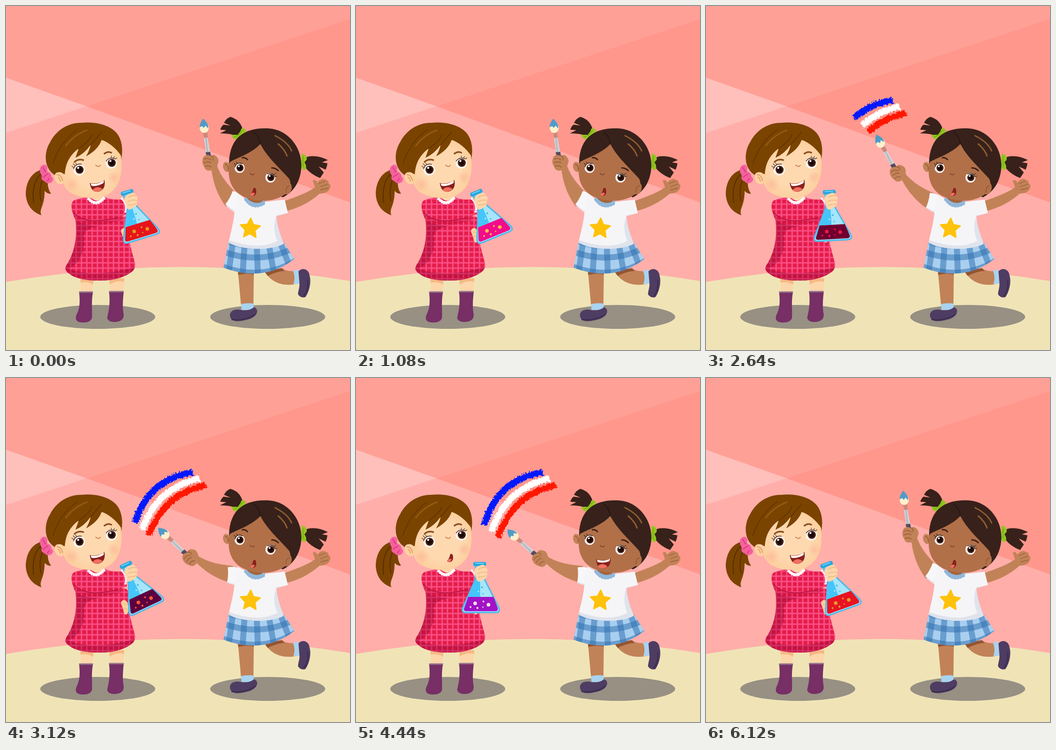
An HTML page for the animation above (6160 ms loop, 748x748 px).

```html
<!DOCTYPE html>
<html lang="en">
<head>
<meta charset="utf-8">
<title>Two girls</title>
<style>
html, body { margin: 0; width: 100%; height: 100%; overflow: hidden; }
svg { display: block; width: 100vw; height: 100vh; }
.line { fill: none; stroke-linecap: round; stroke-linejoin: round; }
.skin { fill: #fdd6aa; }
.tan { fill: #c28257; }
.brown { fill: #7b4300; }
.dark { fill: #37211a; }
.pink { fill: #f6609d; }
.green { fill: #93c51f; }
.boot { fill: #772f65; }
.shoe { fill: #4f3c62; }
.sock { fill: #a9d3ef; }
</style>
</head>
<body>
<svg viewBox="0 0 748 748">
<defs>
  <radialGradient id="face"><stop offset=".6" stop-color="#fed9b0"/><stop offset="1" stop-color="#fdd0a0"/></radialGradient>
  <radialGradient id="blush"><stop stop-color="#fba58e" stop-opacity=".45"/><stop offset="1" stop-color="#fba58e" stop-opacity="0"/></radialGradient>
  <pattern id="check" width="11.6" height="11.6" patternUnits="userSpaceOnUse">
    <rect width="12" height="12" fill="#e41d49"/><path d="M0 1.7H12M1.7 0V12" stroke="#fb5089" stroke-width="3"/>
  </pattern>
  <filter id="rough" x="-20%" y="-20%" width="140%" height="140%" color-interpolation-filters="sRGB">
    <feTurbulence type="fractalNoise" baseFrequency=".28" numOctaves="2" seed="4"/>
    <feDisplacementMap in="SourceGraphic" scale="10" xChannelSelector="R" yChannelSelector="G"/>
  </filter>
  <clipPath id="dressClip"><use href="#dress"/></clipPath>
  <clipPath id="shirtClip"><use href="#shirt"/></clipPath>
  <clipPath id="skirtClip"><use href="#skirt"/></clipPath>
  <g id="smile">
    <path d="M0 4Q18 8 32-3Q35 12 27 19Q16 27 7 20Q2 15 0 4Z" fill="#8b201d"/>
    <path d="M2 5Q18 8 31-2L30 4Q16 12 4 10Z" fill="#fff"/>
    <path d="M6 19Q16 8 28 17Q22 23 15 23Q9 23 6 19Z" fill="#f0705f"/>
  </g>
  <g id="gasp">
    <path d="M2-8Q7-10 8-3Q9 7 2 9Q-4 10-5 6Q0 2 2-8Z" fill="#8b201d"/>
    <path d="M-5 6Q0 0 5 3Q3 9-1 9Q-4 9-5 6Z" fill="#f0705f"/>
  </g>
  <g id="eye">
    <circle r="12.300" fill="#fff"/><circle cx="1" r="8.800" fill="#431f16"/><circle cx="1" r="5.500" fill="#190906"/>
    <circle cx="-2" cy="-4" r="2.300" fill="#fff"/>
  </g>
</defs>

<rect width="748" height="748" fill="#ffaea9"/>
<path d="M0 0H748V28L175 218L0 156Z" fill="#ffa096"/>
<path d="M748 28V427L175 218Z" fill="#ff978c"/>
<path d="M0 156L175 218L0 276Z" fill="#ffbfbb"/>
<path d="M0 600Q374 536 748 598V748H0Z" fill="#f0e4b7"/>
<g fill="#979083"><ellipse cx="199.500" cy="676" rx="125" ry="26"/><ellipse cx="569" cy="676" rx="125" ry="26"/></g>

<g id="leftGirl">
  <path class="brown" d="M88 354C58 356 43 380 43 410C45 432 55 447 77 455C73 447 77 440 80 431C83 421 84 412 84 402Q90 409 98 408Q88 395 92 372Z"/>
  <path class="line" stroke="#572e00" stroke-width="2" d="M76 365Q55 385 60 427M82 372Q70 398 76 424"/>
  <path class="pink" d="M76 349Q84 341 89 349Q91 355 88 359Q98 362 99 371Q106 377 99 383Q90 389 84 381Q75 379 78 369Q70 357 76 349Z"/>
  <path class="line" stroke="#d43b7d" stroke-width="2" d="M80 351L86 361M81 372L91 365M90 381L94 375"/>
  <path class="brown" d="M105 367C82 352 82 318 96 296C112 265 142 253 164 254C202 250 239 263 248 289C257 312 250 333 249 346L128 375Z"/>
  <path class="skin" d="M162 590H191L187 627H163ZM225 592H257L255 627H227Z"/>
  <path d="M162 591H191L189 606Q180 599 162 601ZM225 592H257V600Q240 595 225 606Z" fill="#f7b883"/>
  <path class="boot" d="M159 622H189C185 646 188 660 187 679Q182 690 163 688Q148 686 153 672C161 657 161 643 159 622ZM224 621H256C254 641 253 653 256 672Q256 685 239 687Q222 688 220 678C224 660 227 645 224 621Z"/>
  <path class="line" stroke="#91778b" stroke-width="3" d="M160 622H188M225 621H255"/>
  <path class="skin" d="M184 405H213V425Q198 434 182 421Z"/>
  <path id="dress" d="M147 423Q165 415 185 416Q198 431 213 415Q234 424 260 419L263 453L250 458Q265 455 266 467C263 498 270 521 280 557Q283 567 276 576C257 592 228 598 199 597C166 597 138 589 129 573Q128 567 135 558C151 529 155 498 151 465Q136 433 147 423Z" fill="url(#check)"/>
  <g clip-path="url(#dressClip)">
    <path d="M145 462Q177 482 212 476C188 482 170 484 169 501C174 535 157 562 136 571Q194 594 285 566V610H115L145 515Z" fill="#92002d" opacity=".38"/>
    <path d="M145 447Q178 478 246 458L252 466Q190 485 148 465Z" fill="#b1002d" opacity=".28"/>
  </g>
  <path class="line" stroke="#bd1741" stroke-width="2" d="M148 449Q170 478 243 460"/>
  <path class="line" stroke="#fff" stroke-width="5" stroke-dasharray=".1 5" d="M179 420Q196 439 214 418"/>
  <path class="line" stroke="#fff" stroke-width="3" d="M180 418Q196 435 213 416"/>
  <path class="line" stroke="#fff" stroke-width="5" stroke-dasharray=".1 5" d="M252 419Q264 430 260 447"/>
  <path d="M251 486Q257 479 263 487Q269 499 265 510Q261 518 257 512Q254 499 250 491Z" fill="#fbd19e"/>
  <path class="line" stroke="#e5a66f" d="M254 492Q260 491 263 495M256 501Q262 499 264 505"/>
  <ellipse cx="117" cy="374" rx="11" ry="14" fill="#fdd2a1" transform="rotate(-20 117 374)"/>
  <path class="line" stroke="#e39b66" stroke-width="2" d="M111 367Q120 366 123 380M113 372Q118 375 118 381"/>
  <path d="M126 358C126 332 149 300 198 291Q239 290 250 326C255 365 246 392 227 406C204 423 164 420 141 406C126 396 122 383 126 358Z" fill="url(#face)"/>
  <circle cx="143" cy="388" r="17" fill="url(#blush)"/><circle cx="235" cy="373" r="15" fill="url(#blush)"/>
  <path class="brown" d="M106 365C110 332 130 278 185 271C230 270 250 298 250 325Q232 300 208 291Q201 312 174 327Q182 313 184 302Q171 321 151 330L158 310C137 325 129 345 128 366Q115 357 106 365Z"/>
  <path class="line" stroke="#935a12" stroke-width="3" d="M130 304Q148 280 176 270"/>
  <path class="line" stroke="#5b3100" stroke-width="1.500" d="M102 343Q116 297 155 269M158 310Q183 293 187 279M184 302Q198 286 207 275"/>
  <use href="#eye" x="159" y="356"/><use href="#eye" x="229" y="341"/>
  <g class="line" stroke="#572d1d" stroke-width="1.200">
    <path d="M147 351L143 348M150 347L146 343M154 345L151 341M229 329L229 326M234 330L236 327M238 333L241 330"/>
    <path stroke-width="1.700" d="M147 354Q151 342 164 344M218 337Q225 327 237 332"/>
    <path stroke="#8b4f21" stroke-width="3.500" d="M149 339Q157 332 168 335M214 321Q222 315 229 319"/>
    <path stroke="#cc784b" stroke-width="1.700" d="M195 346Q202 352 205 346"/>
  </g>
  <use id="leftSmile" href="#smile" x="182" y="381"/><use id="leftGasp" href="#gasp" x="203" y="391"/>
</g>

<g id="flask">
  <path d="M260 408H279V437L309 496Q316 510 304 510H239Q227 510 233 497L260 437Z" fill="#a7e5fa" stroke="#4bb9eb" stroke-width="3"/>
  <path d="M261 410H270V476H244L237 503Q232 505 235 498L261 438Z" fill="#44c6fb"/>
  <path id="liquid" d="M244 476H299L308 500Q310 507 303 507H240Q232 507 236 499Z"/>
  <g id="bubbles"><circle cx="259" cy="490" r="4"/><circle cx="288" cy="493" r="4"/><circle cx="277" cy="486" r="2"/><circle cx="264" cy="500" r="2.300"/><circle cx="249" cy="498" r="2"/><circle cx="276" cy="498" r="1.500"/></g>
  <circle cx="274" cy="455" r="2" fill="#42b9ed"/><circle cx="266" cy="464" r="1.500" fill="#d6f4ff"/><circle cx="276" cy="469" r="2" fill="#63cbed"/>
  <rect x="255" y="400" width="28" height="9" rx="4" fill="#28a7e2"/>
  <path class="line" stroke="#73d6fb" stroke-width="2" d="M260 403H277"/>
</g>
<path class="skin" d="M257 421Q258 410 269 408Q278 403 282 411Q288 416 285 425Q286 436 276 439Q266 447 262 438Z"/>
<path class="line" stroke="#e9b078" stroke-width="1.300" d="M266 416Q276 410 282 413M265 425Q276 420 285 423M266 433Q276 432 283 430"/>

<g class="line" id="paint" filter="url(#rough)" stroke-width="14" style="stroke-linecap:butt">
  <path pathLength="1" stroke="#0019ff" d="M406 205C350 214 300 244 279 320"/>
  <path pathLength="1" stroke="#fff" d="M421 219C365 230 320 262 294 334"/>
  <path pathLength="1" stroke="#ff1700" d="M435 233C380 244 335 274 308 347"/>
</g>

<g id="rightGirl">
  <path class="tan" d="M562 577L600 570Q608 578 630 576L629 605C604 609 579 604 562 577Z"/>
  <path d="M562 577L600 570L606 576Q588 577 569 587Z" fill="#925532"/>
  <path class="sock" d="M624 576L636 573L638 604L625 605Q630 589 624 576Z"/>
  <path class="shoe" d="M636 577C645 567 659 573 660 586C665 602 658 624 651 633Q641 636 635 627C635 619 639 612 638 602Z"/>
  <path class="tan" d="M504 572H539L538 651H511Z"/>
  <path d="M504 575H539V584Q522 580 505 585Z" fill="#925532"/>
  <path class="sock" d="M511 648Q525 645 539 647L538 661H512Z"/>
  <path class="shoe" d="M487 670Q490 659 506 660Q528 665 539 655Q547 657 546 666C542 677 532 681 516 684Q486 690 487 670Z"/>
  <path class="line" stroke="#382a4d" stroke-width="2" d="M491 682Q521 685 543 670M656 596Q658 618 648 630"/>
  <path id="skirt" d="M484 513Q542 534 604 514L627 550Q560 602 473 569Z" fill="#a9cff0"/>
  <g class="line" clip-path="url(#skirtClip)" stroke="#2f6fb0" stroke-opacity=".52" stroke-width="13">
    <path d="M494 510L484 580M519 515L514 590M545 515L548 592M571 515L584 590M594 508L618 570"/>
    <path d="M474 535Q552 562 622 528M464 564Q556 602 636 550"/>
    <path stroke-opacity=".25" stroke-width="6" d="M480 516Q545 536 610 513"/>
  </g>

  <path class="tan" d="M606 424C633 414 658 405 672 394L667 380Q672 375 677 384Q687 372 696 378Q703 380 701 385Q708 389 704 397Q699 408 682 408C659 428 635 440 608 446Z"/>
  <path class="line" stroke="#955c37" stroke-width="1.300" d="M681 386L694 381M684 393L700 387M684 400L700 396"/>

  <g id="arm">
    <path d="M430 286L438 285L444 318L435 319Z" fill="#d1d4d9"/>
    <path d="M433 286L436 285L440 318H436Z" fill="#b5bbc3"/>
    <path d="M434 318L444 317L447 332L438 333Z" fill="#554b5d"/>
    <path d="M428 275L437 273L439 286L431 287Z" fill="#cc897b"/>
    <ellipse cx="431" cy="265" rx="10" ry="11" fill="#fff0cd"/>
    <path d="M429 245C439 255 441 262 439 266L434 260L430 265L426 261L421 264Q421 254 429 245Z" fill="#4f9bc8"/>
    <path class="tan" d="M446 350C449 377 456 406 478 436L505 411C484 391 468 372 459 348Z"/>
    <path class="tan" d="M429 329Q435 321 445 326Q453 321 459 329Q465 335 460 345Q458 357 447 357Q435 361 431 350Q424 341 429 329Z"/>
    <path class="line" stroke="#935835" stroke-width="1.400" d="M431 333Q439 329 446 335M431 341Q441 337 446 341M433 349Q441 345 446 350M446 326Q452 329 450 335"/>
  </g>
  <g id="sleeve"><path fill="#f7f7fa" d="M493 402Q508 406 522 423L504 452Q485 443 477 431Q487 419 493 402Z"/><path class="line" stroke="#dde1ea" stroke-width="2" d="M478 431Q486 442 500 446"/></g>
  <path id="shirt" d="M504 410L522 421Q541 438 562 426L606 421L613 450L588 457C589 479 598 502 604 517C573 534 508 530 484 514C489 491 498 460 497 436Z" fill="#f5f5f8"/>
  <path clip-path="url(#shirtClip)" d="M588 455L613 450V460H591Q593 491 609 515L604 525Q548 541 484 515L485 509Q548 532 590 511Q578 483 588 455Z" fill="#d9dee8" opacity=".75"/>
  <path d="M521 411H558V425Q540 439 523 424Z" fill="#a3653b"/>
  <path class="line" stroke="#91b7da" stroke-width="8" stroke-dasharray=".1 6" d="M522 421Q539 444 563 427"/>
  <path class="line" stroke="#91b7da" stroke-width="4" d="M522 419Q540 438 562 425"/>
  <path id="star" fill="#ffc20a" stroke="#ffc20a" stroke-width="3" stroke-linejoin="round"/>

  <path class="dark" d="M503 283Q485 276 465 277L479 270L466 269Q468 262 473 258L488 260L474 254Q479 244 488 241Q506 246 513 263L517 280Z"/>
  <path class="dark" d="M646 337L655 328Q676 323 700 335L687 340L699 342Q698 349 695 356L680 349L691 362L683 374Q662 366 650 350Z"/>
  <path class="green" d="M504 280L490 280Q493 291 504 291L515 285L522 270Q512 260 510 272ZM642 335L643 321Q654 322 654 334L649 340Q656 350 650 357Q639 355 642 341Z"/>
  <path class="line" stroke="#62980d" d="M496 285L508 279L515 269M646 327V350"/>
  <path class="dark" d="M485 341C486 290 515 264 568 266C616 267 646 313 642 352C640 382 625 405 602 416L500 376Z"/>
  <ellipse cx="480" cy="350" rx="8" ry="11" class="tan" transform="rotate(-15 480 350)"/>
  <path class="line" stroke="#8e5231" stroke-width="1.500" d="M477 344Q485 347 483 356"/>
  <path d="M487 339C506 329 536 319 553 300C568 329 594 351 616 376Q623 391 611 406C585 428 548 427 518 415C488 402 479 370 487 339Z" fill="#b27049"/>
  <ellipse cx="612" cy="397" rx="9" ry="13" fill="#b27049" transform="rotate(18 612 397)"/>
  <path class="line" stroke="#8e5231" stroke-width="1.500" d="M609 405Q608 393 616 391"/>
  <path class="line" stroke="#8f5d32" stroke-width="3" d="M585 282Q613 296 621 315M592 300Q607 313 611 326"/>
  <path class="line" stroke="#21110d" stroke-width="1.500" d="M553 300Q551 284 539 274"/>
  <use href="#eye" transform="translate(508 352) scale(.88)"/><use href="#eye" transform="translate(575 373) scale(.88)"/>
  <g class="line" stroke="#3b2118" stroke-width="1.200">
    <path d="M499 345L496 342M503 342L501 339M583 366L587 364M585 371L589 370"/>
    <path stroke-width="1.700" d="M498 350Q502 338 514 343M569 365Q580 360 585 371"/>
    <path stroke-width="3" d="M514 330Q520 329 525 334M578 352Q586 352 592 358"/>
    <path stroke="#794122" stroke-width="1.700" d="M531 364Q535 370 540 365"/>
  </g>
  <use id="rightGasp" href="#gasp" x="536" y="404"/>
  <use id="rightSmile" href="#smile" transform="translate(523 390) rotate(9) scale(.96)"/>
</g>
</svg>

<script>
const LOOP = 6160;
const byId = id => document.getElementById(id);
const clamp = x => Math.max(0, Math.min(1, x));
const ramp = (t, from, to) => clamp((t - from) / (to - from));
const ease = x => (1 - Math.cos(Math.PI * x)) / 2;
const mix = (a, b, k) => a + (b - a) * k;
const strokes = [...byId('paint').children];

// Turning points of the flask's swing; it hangs upright at even positions.
const turns = [360, 1600, 2430, 3520, 4460, 5780];
const MAX_TILT = -35.5;

// Time, liquid colour, bubble colour.
const liquidKeys = [
  [0, [231, 20, 27], [226, 151, 36]],
  [1080, [243, 12, 139], [244, 185, 75]],
  [2640, [111, 0, 48], [237, 26, 63]],
  [3640, [72, 0, 82], [245, 156, 40]],
  [4440, [162, 18, 198], [244, 224, 226]],
  [5120, [246, 28, 232], [250, 218, 224]],
  [LOOP, [231, 20, 27], [226, 151, 36]]
];

function tiltAt(t) {
  if (t < turns[0]) t += LOOP;
  const points = [...turns, turns[0] + LOOP];
  let i = 0;
  while (t >= points[i + 1]) i++;
  const k = ease(ramp(t, points[i], points[i + 1]));
  return MAX_TILT * (i % 2 ? 1 - k : k);
}

function colorAt(t, part) {
  const next = liquidKeys.findIndex(key => key[0] > t);
  const a = liquidKeys[next - 1], b = liquidKeys[next];
  const k = ramp(t, a[0], b[0]);
  return `rgb(${a[part].map((v, i) => Math.round(mix(v, b[part][i], k)))})`;
}

function drawStar() {
  const points = Array.from({ length: 10 }, (_, i) => {
    const a = (i * 36 - 87) * Math.PI / 180, r = i % 2 ? 11 : 22.5;
    return `${531 + r * Math.cos(a)} ${484 + r * Math.sin(a)}`;
  });
  byId('star').setAttribute('d', `M${points.join('L')}Z`);
}

function render(t) {
  byId('flask').setAttribute('transform', `rotate(${tiltAt(t)} 269 424)`);
  byId('liquid').setAttribute('fill', colorAt(t, 1));
  byId('bubbles').setAttribute('fill', colorAt(t, 2));

  const sweep = ease(ramp(t, 2000, 3260));
  const reach = sweep - ease(ramp(t, 4800, 6040));
  byId('arm').setAttribute('transform', `rotate(${-39.5 * reach} 496 426)`);
  byId('sleeve').setAttribute('transform', `rotate(${-27 * reach} 508 430)`);

  strokes.forEach(s => s.setAttribute('stroke-dasharray', `${sweep} 2`));
  const fade = 1 - ramp(t, 4980, 5520);
  byId('paint').setAttribute('opacity', sweep > 0.001 ? fade : 0);

  const swap = ramp(t, 3620, 3820) - ramp(t, 5640, 5840);
  for (const id of ['leftGasp', 'rightSmile']) byId(id).setAttribute('opacity', swap);
  for (const id of ['leftSmile', 'rightGasp']) byId(id).setAttribute('opacity', 1 - swap);
}

drawStar();
const start = performance.now();
function tick() {
  render((performance.now() - start) % LOOP);
  requestAnimationFrame(tick);
}
render(0);
requestAnimationFrame(tick);
</script>
</body>
</html>
```
